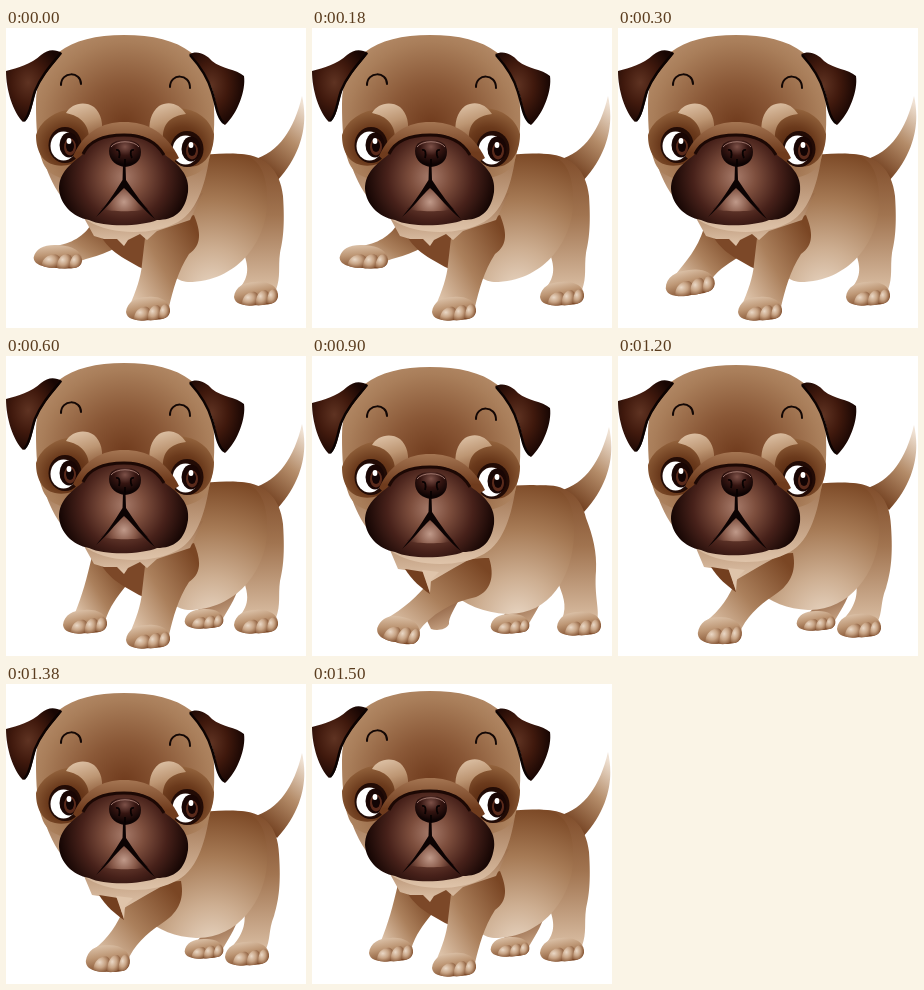
Recreate the animation shown at these times as an HTML page. Size 300 by 300 pixels, loop 1800 ms.

```html
<!DOCTYPE html>
<html lang="en">
<head>
<meta charset="utf-8">
<title>Walking pug</title>
<style>
html, body { margin: 0; width: 100%; height: 100%; overflow: hidden; background: #fff; }
svg { display: block; width: 300px; height: 300px; }
.reach, .lower, .stand, .stride, .plant, .upright, .walk, .head { animation: 1800ms step-end infinite; }
.reach { animation-name: reach; }
.lower { animation-name: lower; }
.stand { animation-name: stand; }
.stride { animation-name: stride; }
.plant { animation-name: plant; }
.upright { animation-name: upright; }
.walk { animation-name: walk; }
.head { animation-name: bob; }
@keyframes reach { 0% { visibility: visible } 16.666%, 100% { visibility: hidden } }
@keyframes lower { 0% { visibility: hidden } 16.666% { visibility: visible } 33.333%, 100% { visibility: hidden } }
@keyframes stand { 0% { visibility: hidden } 33.333% { visibility: visible } 50% { visibility: hidden } 83.333%, 100% { visibility: visible } }
@keyframes stride { 0% { visibility: hidden } 50% { visibility: visible } 66.666%, 100% { visibility: hidden } }
@keyframes plant { 0% { visibility: hidden } 66.666% { visibility: visible } 83.333%, 100% { visibility: hidden } }
@keyframes upright { 0% { visibility: visible } 50% { visibility: hidden } 83.333%, 100% { visibility: visible } }
@keyframes walk { 0% { visibility: hidden } 50% { visibility: visible } 83.333%, 100% { visibility: hidden } }
@keyframes bob { 0% { transform: none } 50% { transform: translateY(4px) } 66.666% { transform: translateY(2px) } 83.333%, 100% { transform: none } }
</style>
</head>
<body>
<svg viewBox="0 0 300 300">
<defs>
  <radialGradient id="skull" gradientUnits="userSpaceOnUse" cx="119" cy="98" r="105">
    <stop offset="0" stop-color="#6f3a1c"/><stop offset=".4" stop-color="#8a5837"/><stop offset=".8" stop-color="#a97e5a"/><stop offset="1" stop-color="#b58c69"/>
  </radialGradient>
  <linearGradient id="jaw" x1="0" y1="0" x2="0" y2="1">
    <stop offset="0" stop-color="#9a6c49"/><stop offset="1" stop-color="#dfc4aa"/>
  </linearGradient>
  <radialGradient id="torso" gradientUnits="userSpaceOnUse" cx="206" cy="262" r="138">
    <stop offset="0" stop-color="#e8d5c2"/><stop offset=".3" stop-color="#cdae91"/><stop offset=".65" stop-color="#a67a55"/><stop offset="1" stop-color="#7c4926"/>
  </radialGradient>
  <linearGradient id="rump" x1=".5" y1="0" x2=".5" y2="1">
    <stop offset="0" stop-color="#7f4c2a"/><stop offset=".45" stop-color="#a17450"/><stop offset="1" stop-color="#d9bda2"/>
  </linearGradient>
  <linearGradient id="tail" x1=".8" y1="0" x2=".3" y2="1">
    <stop offset="0" stop-color="#f0e2d4"/><stop offset=".45" stop-color="#b48c69"/><stop offset="1" stop-color="#6a3616"/>
  </linearGradient>
  <linearGradient id="limb" x1="0" y1=".8" x2=".9" y2=".1">
    <stop offset="0" stop-color="#dcc1a7"/><stop offset=".45" stop-color="#ab805c"/><stop offset="1" stop-color="#7a4624"/>
  </linearGradient>
  <linearGradient id="far" x1=".2" y1="0" x2=".6" y2="1">
    <stop offset="0" stop-color="#733f1f"/><stop offset="1" stop-color="#c6a283"/>
  </linearGradient>
  <linearGradient id="foot" x1=".2" y1="0" x2=".6" y2="1">
    <stop offset="0" stop-color="#e0c8b0"/><stop offset=".45" stop-color="#bd9674"/><stop offset="1" stop-color="#7a4624"/>
  </linearGradient>
  <radialGradient id="toe" cx=".35" cy=".4" r=".7">
    <stop offset="0" stop-color="#ead8c6"/><stop offset=".5" stop-color="#c7a384"/><stop offset="1" stop-color="#814f2e"/>
  </radialGradient>
  <radialGradient id="ear" cx=".4" cy=".45" r=".6">
    <stop offset="0" stop-color="#5f3322"/><stop offset=".5" stop-color="#40190d"/><stop offset="1" stop-color="#180603"/>
  </radialGradient>
  <radialGradient id="muzzle" gradientUnits="userSpaceOnUse" cx="118" cy="149" r="66">
    <stop offset="0" stop-color="#a67a69"/><stop offset=".3" stop-color="#7d4e3d"/><stop offset=".65" stop-color="#47211a"/><stop offset="1" stop-color="#140503"/>
  </radialGradient>
  <radialGradient id="lip" gradientUnits="userSpaceOnUse" cx="118" cy="174" r="25">
    <stop offset="0" stop-color="#c09a8a"/><stop offset=".5" stop-color="#865848"/><stop offset="1" stop-color="#381510"/>
  </radialGradient>
  <linearGradient id="bridge" x1="0" y1="0" x2="0" y2="1">
    <stop offset="0" stop-color="#a47552"/><stop offset=".6" stop-color="#6f3b1d"/>
  </linearGradient>
  <radialGradient id="mask" cx=".5" cy=".65" r=".65">
    <stop offset="0" stop-color="#4c2009"/><stop offset=".5" stop-color="#6b3a1c"/><stop offset="1" stop-color="#96663f"/>
  </radialGradient>
  <linearGradient id="brow" x1=".3" y1="0" x2=".6" y2="1">
    <stop offset="0" stop-color="#dcc0a4"/><stop offset=".5" stop-color="#bd9673"/><stop offset="1" stop-color="#8a5836"/>
  </linearGradient>
  <radialGradient id="nose" cx=".5" cy=".25" r=".65">
    <stop offset="0" stop-color="#7d5148"/><stop offset=".5" stop-color="#351511"/><stop offset="1" stop-color="#0d0303"/>
  </radialGradient>
  <g id="paw">
    <path d="M-22,3C-21,-7-12,-12 0,-12C12,-13 21,-8 22,0C23,8 16,11 4,11C-8,12-21,12-22,3Z" fill="url(#foot)"/>
    <g fill="url(#toe)">
      <path d="M-14,10C-14,2-7,-3-1,-2C4,0 4,9-1,11C-5,12-11,12-14,10Z"/>
      <path d="M0,11C-1,3 3,-4 9,-4C14,-3 14,6 10,10C7,11 3,12 0,11Z"/>
      <path d="M11,9C11,2 13,-5 18,-5C22,-3 23,4 19,8C16,10 14,10 11,9Z"/>
    </g>
  </g>
  <path id="tailShape" d="M296,68C301,90 300,121 271,153L247,132C273,124 288,102 296,68Z" fill="url(#tail)"/>
  <g id="hindFar">
    <path d="M196,238L234,222C232,240 224,250 216,264L184,260C194,254 199,248 196,238Z" fill="url(#far)"/>
    <use href="#paw" transform="translate(198 263) scale(.88 .83)"/>
  </g>
  <g id="eye">
    <ellipse rx="16.5" ry="18" fill="#220b05"/>
    <ellipse cx="-1.5" cy="1" rx="13" ry="14.5" fill="#fff"/>
    <ellipse cx="4" rx="9.5" ry="12.5" fill="#190604"/>
    <ellipse cx="5" cy="2" rx="6" ry="8.5" fill="#5a2a1b"/>
    <ellipse cx="5" cy="1" rx="4" ry="6" fill="#120404"/>
    <ellipse cx="4" cy="-4" rx="2.4" ry="3" fill="#fff"/>
  </g>
</defs>

<!-- Standing torso -->
<g class="upright">
  <use href="#tailShape"/>
  <g class="stand"><use href="#hindFar"/></g>
  <path d="M225,126C255,124 274,139 277,168C279,198 277,212 274,225C272,240 275,248 270,262L232,262C243,250 243,240 238,226Z" fill="url(#rump)"/>
  <use href="#paw" transform="translate(250 266)"/>
  <path d="M150,140C185,124 225,124 240,127C256,134 262,150 261,178C259,214 231,254 182,254C158,252 140,220 150,140Z" fill="url(#torso)"/>
</g>
<g class="reach">
  <path d="M84,198C74,213 58,217 43,219L62,237C82,229 99,229 119,213L108,203Z" fill="url(#limb)"/>
  <use href="#paw" transform="translate(52 229) rotate(6) scale(1.1 .98)"/>
</g>
<g class="lower">
  <path d="M86,200C79,222 68,233 58,246L90,257C98,242 109,237 119,230L118,207Z" fill="url(#limb)"/>
  <use href="#paw" transform="translate(72 255) rotate(-5) scale(1.12 1.08)"/>
</g>
<g class="stand">
  <path d="M86,200C81,222 76,240 69,257L99,265C104,250 111,241 119,231L118,207Z" fill="url(#limb)"/>
  <use href="#paw" transform="translate(79 266)"/>
</g>
<g class="upright">
  <path d="M95,209L118,205L142,205L140,242L133,239L119,231C110,226 102,219 95,209Z" fill="#7c4828"/>
  <path d="M139,210L151,198L188,187C195,204 196,217 183,226C172,243 167,262 163,279L124,277C130,263 135,249 136,236Z" fill="url(#limb)"/>
  <use href="#paw" transform="translate(142 281)"/>
  <path d="M78,190L88,208L98,211L111,211L118,218L122,212L134,206L141,212L151,203L184,192L197,165Z" fill="url(#jaw)"/>
</g>

<!-- Long stride -->
<g class="stride">
  <use href="#tailShape" transform="translate(1 3)"/>
  <use href="#hindFar" y="5"/>
  <path d="M225,130C252,126 269,140 274,162C281,180 285,196 284,215C282,240 288,254 285,265L250,263C256,249 250,238 246,226Z" fill="url(#rump)"/>
  <use href="#paw" transform="translate(267 268)"/>
  <path d="M150,140C185,128 225,127 241,131C257,137 263,154 262,180C260,222 237,259 195,258C172,257 152,248 138,236Z" fill="url(#torso)"/>
  <path d="M106,246L150,238C143,252 136,262 137,268C134,274 125,275 119,273Z" fill="url(#far)"/>
  <path d="M118,225C132,208 153,202 177,202C183,220 179,235 164,241C140,246 119,258 106,276L74,263C91,253 106,240 118,225Z" fill="url(#limb)"/>
  <use href="#paw" transform="translate(87 274) rotate(14) scale(.98 1.12)"/>
</g>

<!-- Weight on the near foot -->
<g class="plant">
  <use href="#tailShape" transform="translate(0 1)"/>
  <use href="#hindFar" y="2"/>
  <path d="M225,127C255,125 272,140 273,170C275,200 273,215 268,232C262,247 265,256 259,267L224,265C238,250 240,239 238,226Z" fill="url(#rump)"/>
  <use href="#paw" transform="translate(241 270)"/>
  <path d="M150,140C185,125 225,125 240,128C256,135 262,151 261,179C259,217 231,255 190,254C170,253 152,246 138,234Z" fill="url(#torso)"/>
  <path d="M118,225C130,205 151,198 175,197C179,217 171,230 155,240C140,250 128,261 121,278L87,266C103,254 111,240 118,225Z" fill="url(#limb)"/>
  <use href="#paw" transform="translate(102 275) rotate(4) scale(1 1.14)"/>
</g>

<g class="head">
  <g class="walk">
    <path d="M78,190L86,209L99,211L118,222L142,208L151,203L180,187L198,150Z" fill="url(#jaw)"/>
    <path d="M93,209L112,212L118,234C109,228 100,220 93,209Z" fill="#733f1f"/>
    <path d="M110,210L127,212L119,220L118,233Z" fill="#dfc4aa"/>
  </g>
  <path d="M35,120C40,145 52,175 82,193C105,207 147,208 172,194C193,182 200,152 204,126Z" fill="url(#jaw)"/>
  <path d="M30,76C30,29 62,7 118,7C176,7 208,29 208,79C209,104 207,122 201,137C190,152 160,155 118,155C72,155 45,154 37,135C31,120 30,97 30,76Z" fill="url(#skull)"/>

  <g fill="url(#ear)">
    <path d="M56,25C49,21 42,21 35,27C25,36 12,40 0,43C0,62 7,84 17,94C25,91 26,75 30,63C36,48 47,37 56,25Z"/>
    <path d="M183,26C192,22 200,26 206,33C216,41 230,41 238,48C240,62 232,85 219,97C211,92 211,76 207,64C203,50 194,38 183,26Z"/>
  </g>
  <path d="M55,25C45,37 35,48 29,63C25,75 24,88 18,93M184,27C194,38 202,50 206,64C210,76 211,90 218,95" fill="none" stroke="#0c0302" stroke-width="2.5"/>
  <g fill="none" stroke="#120705" stroke-width="2" stroke-linecap="round">
    <path d="M55,57C55,43 75,43 75,56"/>
    <path d="M164,59C164,45 184,45 184,60"/>
  </g>

  <path d="M30,107C36,88 58,79 77,81C91,84 98,97 92,112C84,128 66,141 49,137C35,134 30,121 30,107Z" fill="url(#mask)"/>
  <path d="M208,106C203,87 184,78 162,80C148,83 141,97 147,111C154,129 173,142 190,138C203,134 208,120 208,106Z" fill="url(#mask)"/>
  <g fill="url(#brow)">
    <path d="M60,85C65,76 78,72 88,79C95,85 98,96 95,108L83,113C84,97 75,88 60,85Z"/>
    <path d="M180,86C174,76 163,72 153,78C145,84 142,95 144,107L157,112C156,96 164,88 180,86Z"/>
  </g>
  <use href="#eye" x="59" y="117"/>
  <use href="#eye" x="181" y="121"/>

  <path d="M67,128C78,104 96,94 118,94C141,94 160,104 173,130L150,145H86Z" fill="url(#bridge)"/>
  <path d="M118,106C134,105 149,111 159,127C173,137 184,147 182,164C179,184 168,192 151,192C137,198 100,200 83,192C66,189 54,176 53,161C53,144 65,136 76,127C85,112 101,107 118,106Z" fill="url(#muzzle)"/>
  <path d="M118,158C106,167 100,175 95,181C106,184 131,184 142,181C136,174 128,164 118,158Z" fill="url(#lip)"/>
  <path d="M117,137H119.500L120,152C128,165 138,177 149,191C137,182 127,168 118,160C109,168 101,180 90,189C100,177 108,166 116.500,152Z" fill="#0c0303"/>
  <path d="M77,126C84,111 100,107 118,107C136,107 150,113 158,127" fill="none" stroke="#1c0804" stroke-width="3"/>
  <path d="M103,123C103,114 111,112 119,112C128,112 135,115 135,124C135,134 127,138 119,139C111,138 103,133 103,123Z" fill="url(#nose)"/>
  <path d="M105,119C110,112 128,112 133,119" fill="none" stroke="#b58c82" stroke-width=".8"/>
  <path d="M119,131V138M110,122C114,121 114,126 113,130M128,122C124,121 124,126 126,130" fill="none" stroke="#080202" stroke-width="1.8"/>
</g>
</svg>
</body>
</html>
```
